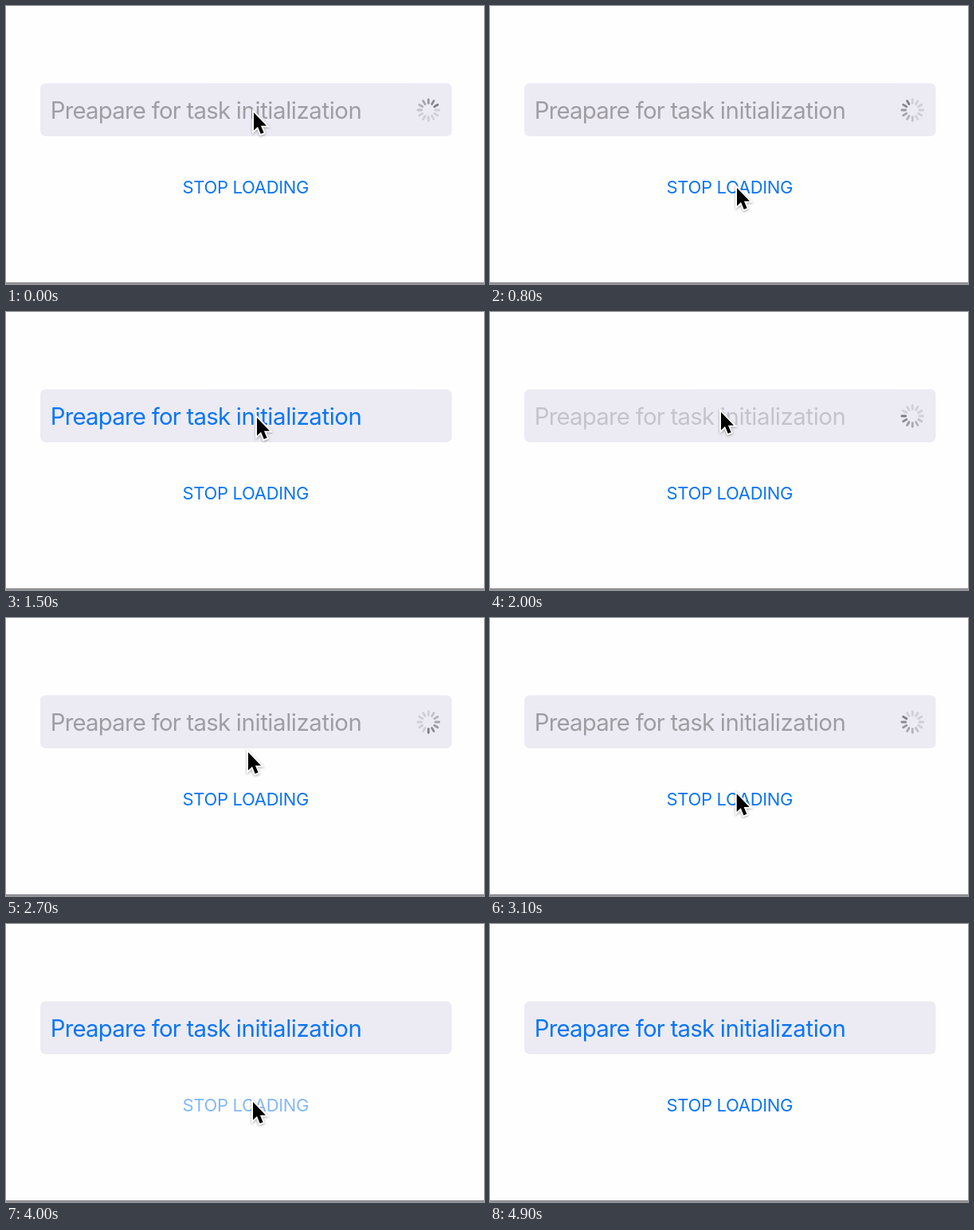
Recreate the animation shown at these times as an HTML page. Size 600 px wide and 350 px high, loop 5 s.

```html
<!DOCTYPE html>
<html lang="en">
<head>
<meta charset="utf-8">
<title>Loading button</title>
<style>
  html, body { margin: 0; width: 100%; height: 100%; overflow: hidden; background: #fffeff; }
  svg { display: block; width: 600px; height: 350px; }
  text { font-family: Inter, Roboto, sans-serif; font-weight: 420; fill: #0b75f5; }
  #label { font-size: 29.4px; letter-spacing: -0.78px; }
  #label tspan { letter-spacing: -0.42px; }
  #stop { font-size: 22px; letter-spacing: -0.33px; }
  #cursor { filter: drop-shadow(0 1.5px 1.5px rgba(0, 0, 0, .35)); }
</style>
</head>
<body>
<svg viewBox="0 0 600 350">
  <rect width="600" height="350" fill="#fffeff"/>
  <rect x="43" y="97.3" width="516.6" height="66.7" rx="7" fill="#ecebf3"/>
  <text id="label" x="55.7" y="142">Preapare for task <tspan>initialization</tspan></text>
  <g id="spinner" transform="translate(530.3 131)" stroke="#6f6e75" stroke-width="2.8" stroke-linecap="round"></g>
  <text id="stop" x="221.6" y="236">STOP LOADING</text>
  <rect y="348" width="600" height="1.7" fill="#77767b"/>
  <g id="cursor">
    <path transform="scale(.95)" d="M0 0V24L5.3 19 9.2 28.5 13.3 26.8 9.4 17.5H16.8Z"
          stroke="#fff" stroke-width="4" paint-order="stroke"/>
  </g>
</svg>
<script>
const LOOP = 5000, TICK = 100, SPOKES = 12;
const $ = id => document.getElementById(id);
const clamp = v => Math.min(1, Math.max(0, v));
const easeOut = k => Math.sin(clamp(k) * Math.PI / 2);

const home = { x: 311, y: 134 };
const moves = [
  { from: 0, to: 600, x: 310, y: 229 },
  { from: 1200, to: 1500, x: 315, y: 133 },
  { from: 1500, to: 1900, x: 290, y: 126 },
  { from: 2500, to: 2700, x: 304, y: 169 },
  { from: 2700, to: 3200, x: 310, y: 224 }
];

function cursorAt(t) {
  let { x, y } = home;
  for (const m of moves) {
    const k = easeOut((t - m.from) / (m.to - m.from));
    x += (m.x - x) * k;
    y += (m.y - y) * k;
  }
  return [x, y];
}

// Opacity dips quickly at a press and recovers slowly
function press(t, when) {
  const away = t < when ? (when - t) / 100 : (t - when) / 300;
  return 1 - .75 * clamp(1 - away);
}

const spokes = Array.from({ length: SPOKES }, (_, i) => {
  const el = document.createElementNS("http://www.w3.org/2000/svg", "line");
  el.setAttribute("y1", -13.4);
  el.setAttribute("y2", -8.6);
  el.setAttribute("transform", `rotate(${i * 360 / SPOKES})`);
  return $("spinner").appendChild(el);
});

function spin(t) {
  const first = t < 2000 ? 2 : 9.7;
  const head = Math.floor(first + (t % 2000) / 1000 * SPOKES);
  spokes.forEach((el, i) => {
    const age = (head - i + SPOKES) % SPOKES;
    el.setAttribute("opacity", Math.max(.22, .88 - age * .11));
  });
}

function draw(t) {
  const loading = t < 1200 || (t >= 2000 && t < 4000);
  $("label").style.fill = loading ? "#9f9da3" : "";
  $("label").style.opacity = press(t, 1900);
  $("stop").style.opacity = press(t, 1100) * press(t, 3900);
  $("spinner").style.display = loading ? "" : "none";
  spin(t);
  $("cursor").setAttribute("transform", `translate(${cursorAt(t)})`);
  $("cursor").style.display = t < 4200 ? "" : "none";
}

const start = performance.now();
function loop(now) {
  const t = Math.max(0, now - start) % LOOP;
  draw(Math.floor(t / TICK) * TICK);
  requestAnimationFrame(loop);
}
draw(0);
requestAnimationFrame(loop);
</script>
</body>
</html>
```
